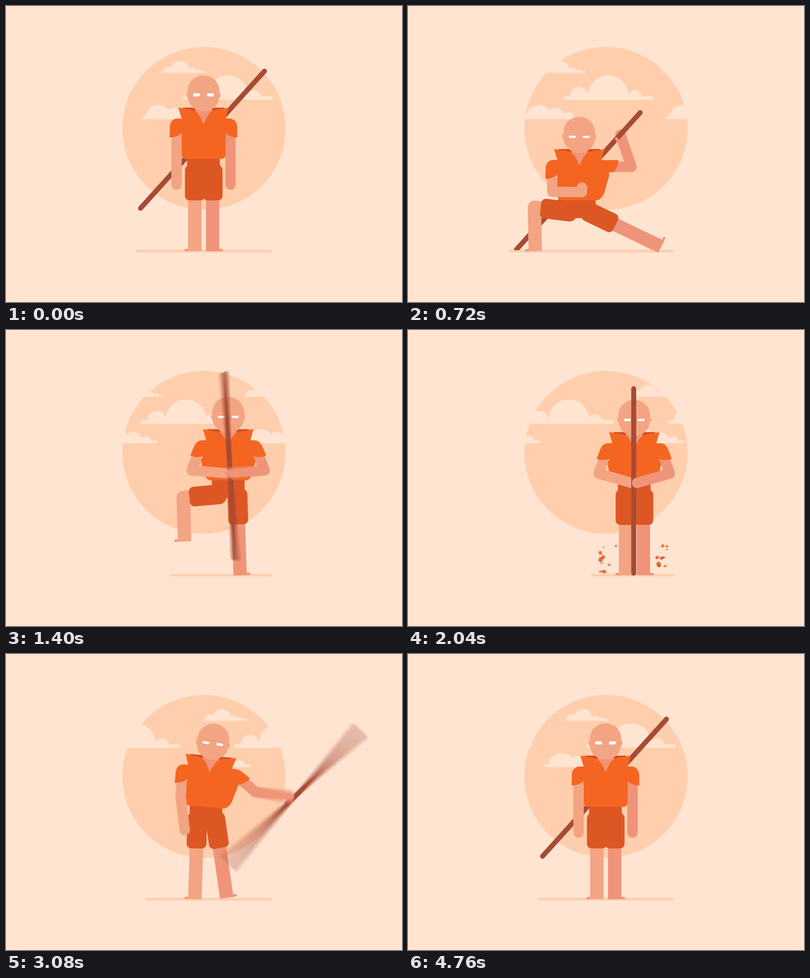
Write an HTML page with a canvas that moves like this. It is 800 px wide and 600 px high and loops after 4800 ms.

```html
<!DOCTYPE html>
<html lang="en">
<head>
<meta charset="utf-8">
<title>Staff form</title>
<style>
html, body { margin: 0; width: 100%; height: 100%; overflow: hidden; background: #ffe4d2; }
canvas { display: block; width: 800px; height: 600px; }
</style>
</head>
<body>
<canvas id="stage" width="800" height="600"></canvas>
<script>
const LOOP = 4800, STEP = 40, SHUTTER = 28, SAMPLES = 16;
const SKY = '#ffe4d2', SUN = '#ffceac', SHIRT = '#f56522', SHORTS = '#dc5723', COLLAR = '#d14f25',
  STAFF = '#a64b35', SKIN = '#f3a483', SHADE = '#ef9478';
const RAD = Math.PI / 180;

const screen = document.getElementById('stage').getContext('2d');
const layer = document.createElement('canvas');
layer.width = 800;
layer.height = 600;
const c = layer.getContext('2d');

// Key poses: x and y move the body, arm angles are measured outwards from straight down.
const feetUnder = x => ({ leftFootX: 381.5 + x, leftFootY: 497, rightFootX: 417.5 + x, rightFootY: 497 });
const arms = (leftUpper, leftFore, rightUpper, rightFore) => ({ leftUpper, leftFore, rightUpper, rightFore });
const grip = (upper, fore) => arms(-upper, fore, upper, -fore);
const staffAt = (staffX, staffY) => ({ staffX, staffY });

const stand = { x: 0, y: 0, lean: 0, squint: 0, fist: 0, ground: 264.5,
  ...feetUnder(0), ...arms(0, 0, 0, 0), ...staffAt(397, 271) };
const lunge = { ...stand, x: -53, y: 84, squint: 1, fist: 9, ground: 206.5,
  leftFootX: 257, rightFootX: 511.5, rightFootY: 488, ...arms(0, 90, 90, 199), ...staffAt(344, 355) };
const whirl = { ...lunge, ...arms(0, 90, 85, 93), ...staffAt(503, 318) };
const crane = { ...stand, x: 50, y: -5, squint: 1, ground: 334.5,
  leftFootX: 361, leftFootY: 428.5, rightFootX: 473, ...grip(22, 85), ...staffAt(452, 276) };
const lift = { ...crane, x: 56, y: -10, ...grip(20, 112), ...staffAt(455, 235) };
const slam = { ...stand, x: 58, y: 1, squint: 1, ground: 372.5,
  ...feetUnder(58), ...grip(20, 74), ...staffAt(456, 306) };
const cast = { ...stand, x: 5, lean: 5, squint: 0.7, ground: 284.5,
  rightFootX: 446, rightFootY: 494, ...arms(1, 12, 55, 87), ...staffAt(583, 290) };
const stow = { ...stand, squint: 1, ...arms(0, 0, 80, 205) };
const swing = { ...stand, squint: 1, ...arms(0, 0, 61, 61) };

const beats = [[80, stand], [480, lunge], [760, lunge], [960, whirl], [1100, whirl], [1400, crane],
  [1640, lift], [1720, lift], [1840, slam], [2640, slam], [3080, cast], [3400, stow], [3460, stow],
  [3680, swing], [3800, stand]];

// Cubic through the beats that never overshoots a pose.
function valueAt(field, t) {
  const time = i => beats[i][0], value = i => beats[i][1][field], last = beats.length - 1;
  if (t <= time(0)) return value(0);
  if (t >= time(last)) return value(last);
  const secant = i => (value(i + 1) - value(i)) / (time(i + 1) - time(i));
  const slope = i => {
    if (i === 0 || i === last) return 0;
    const a = secant(i - 1), b = secant(i);
    return a * b > 0 ? 2 * a * b / (a + b) : 0;
  };
  const i = beats.findIndex(beat => beat[0] > t) - 1;
  const w = time(i + 1) - time(i), u = (t - time(i)) / w, v = 1 - u;
  return value(i) * (1 + 2 * u) * v * v + slope(i) * w * u * v * v
    + value(i + 1) * u * u * (3 - 2 * u) - slope(i + 1) * w * u * u * v;
}

function ease(t, from, to) {
  const u = Math.min(1, Math.max(0, (t - from) / (to - from)));
  return u < 0.5 ? 2 * u * u : 1 - 2 * (1 - u) ** 2;
}

function poseAt(t) {
  const pose = { t };
  for (const field in stand) pose[field] = valueAt(field, t);
  pose.staffTurn = 42 + 498 * ease(t, 740, 1440) + 222 * ease(t, 2890, 3490);
  const settle = Math.max(0, t - 3800);
  const sway = -6 * Math.sin(settle / 90) * Math.exp(-settle / 130);
  pose.rightUpper += sway;
  pose.rightFore += sway;
  return pose;
}

function line(points, width, color, cap = 'round') {
  c.beginPath();
  points.forEach(([x, y]) => c.lineTo(x, y));
  c.lineWidth = width;
  c.strokeStyle = color;
  c.lineCap = cap;
  c.lineJoin = 'round';
  c.stroke();
}

function box(x, y, w, h, r, color) {
  c.beginPath();
  c.roundRect(x, y, w, h, r);
  c.fillStyle = color;
  c.fill();
}

function oval(x, y, rx, ry, color, turn = 0) {
  c.beginPath();
  c.ellipse(x, y, rx, ry, turn, 0, 7);
  c.fillStyle = color;
  c.fill();
}

function local(x, y, turn, draw) {
  c.save();
  c.translate(x, y);
  c.rotate(turn);
  draw();
  c.restore();
}

// Domes are [offset from the left end, top, radius].
function cloud(x, base, width, bar, ...domes) {
  box(x, base - bar, width, bar, bar / 2, SKY);
  c.save();
  c.beginPath();
  c.rect(x, 0, width, base - bar / 2);
  c.clip();
  domes.forEach(([dx, top, r]) => oval(x + dx, top + r, r, r, SKY));
  c.restore();
}

function drawSky(t) {
  c.fillStyle = SKY;
  c.fillRect(0, 0, 800, 600);
  oval(400, 248, 165, 165, SUN);
  const drift = t * 0.0605;
  for (const gap of [0, LOOP * 0.0605]) {
    cloud(357 + gap - drift, 190, 182, 7, [32, 164, 19], [91, 140.5, 41], [144, 171, 15]);
    cloud(274 + gap - drift, 229.5, 117, 5.5, [34, 200.5, 27], [67, 206.5, 20], [94, 215, 10.5]);
  }
  for (const x of [315 - t * 0.062, 549 - t * 0.04875])
    cloud(x, 135.5, 88, 3.5, [13, 122, 10], [37, 111.5, 19], [62, 125, 8], [75, 128, 6]);
}

function drawStaff(p, cutAtGround) {
  c.save();
  if (cutAtGround) {
    c.beginPath();
    c.rect(0, 0, 800, 495);
    c.clip();
  }
  const dx = Math.sin(p.staffTurn * RAD) * 187, dy = -Math.cos(p.staffTurn * RAD) * 187;
  line([[p.staffX - dx, p.staffY - dy], [p.staffX + dx, p.staffY + dy]], 10, STAFF);
  c.restore();
}

// Two-bone leg with the knee bending outwards; the hips never rise above standing height.
function solveLeg(p, side) {
  const hip = [399.5 + p.x + side * 18, 333 + Math.max(0, p.y)];
  const foot = side < 0 ? [p.leftFootX, p.leftFootY] : [p.rightFootX, p.rightFootY];
  const thigh = 73.5, shin = 89;
  const dx = foot[0] - hip[0], dy = foot[1] - hip[1], d = Math.hypot(dx, dy);
  const ux = dx / d, uy = dy / d;
  let along = d * thigh / (thigh + shin), out = 0;
  if (d < thigh + shin) {
    along = (thigh * thigh - shin * shin + d * d) / (2 * d);
    out = side * Math.sqrt(Math.max(0, thigh * thigh - along * along));
  }
  return { hip, foot, knee: [hip[0] + ux * along + uy * out, hip[1] + uy * along - ux * out] };
}

function drawLeg(p, side) {
  const { hip, knee, foot } = solveLeg(p, side);
  const skin = side < 0 ? SKIN : SHADE;
  const angle = (a, b) => -Math.atan2(b[0] - a[0], b[1] - a[1]);
  line([hip, knee], 27, skin, 'butt');
  local(...knee, angle(knee, foot), () => {
    const length = Math.hypot(foot[0] - knee[0], foot[1] - knee[1]);
    c.scale(side, 1);
    box(0, length - 4.5, 21, 4.5, [2, 3, 1, 0], SHADE);
    box(-13.5, -13.5, 27, length + 13.5, [13.5, 13.5, 0, 0], skin);
  });
  local(...hip, angle(hip, knee), () => box(-20, -13, 40, 74, [14, 14, 9, 9], SHORTS));
}

function inTorso(p, draw) {
  local(399.3 + p.x, 320 + p.y, p.lean * RAD, () => {
    c.translate(-399.3, -320);
    draw();
  });
}

const reach = ([x, y], angle, length) =>
  [x + Math.sin(angle * RAD) * length, y + Math.cos(angle * RAD) * length];

function drawArm(p, side) {
  const upper = side < 0 ? p.leftUpper : p.rightUpper, fore = side < 0 ? p.leftFore : p.rightFore;
  const fist = side < 0 ? p.fist : 0;
  const shoulder = [399 + side * 54.5, 242];
  const elbow = reach(shoulder, upper, 51), wrist = reach(elbow, fore, 69 - fist);
  const points = [shoulder, elbow, wrist];
  if (fist > 0.1) points.push(reach(wrist, fore + 90, fist));
  line(points, 21, side < 0 ? SKIN : SHADE);
  return wrist;
}

function drawSleeve(p, side) {
  local(399 + side * 54.5, 242, -(side < 0 ? p.leftUpper : p.rightUpper) * RAD, () => {
    c.scale(side, 1);
    c.beginPath();
    c.moveTo(-11, -14);
    c.lineTo(-3, -14);
    c.bezierCurveTo(7, -14, 13.5, -7, 13.5, 3);
    c.lineTo(14, 24.5);
    c.quadraticCurveTo(0, 24.5, -11, 15);
    c.fillStyle = SHIRT;
    c.fill();
  });
}

// Half of the shirt; a raised arm widens it at the armpit.
function drawShirtHalf(side, armAngle) {
  const flare = 16 * Math.min(1, 2.2 * Math.abs(Math.sin(armAngle * RAD)));
  const at = d => 399.2 + side * d;
  c.beginPath();
  c.moveTo(at(-1), 238);
  c.lineTo(at(1.2), 238);
  c.quadraticCurveTo(at(8), 218, at(19), 211.5);
  c.lineTo(at(51), 206);
  c.lineTo(at(44.5), 228);
  c.lineTo(at(44.5 + flare * 0.7), 229);
  c.lineTo(at(44.5 + flare), 259);
  c.lineTo(at(44.5 + flare * 0.35), 300 - flare * 0.3);
  c.quadraticCurveTo(at(44), 310, at(36 - flare * 0.2), 310);
  c.lineTo(at(-1), 310);
  c.fillStyle = SHIRT;
  c.fill();
}

function drawShirt(p) {
  box(357, 206, 84, 7, 0, COLLAR);
  box(383, 195, 33, 43.5, 0, SHADE);
  drawShirtHalf(-1, p.leftUpper);
  drawShirtHalf(1, p.rightUpper);
}

function drawHead(p) {
  local(399, 214, p.lean * 0.6 * RAD, () => {
    for (const side of [-1, 1]) oval(side * 31.5, -33.5, 2.7, 5, SKIN);
    box(-32, -73.5, 64, 73.5, 32, SKIN);
    const s = p.squint, round = 3 - 2.5 * s;
    for (const x of [-21, 7]) box(x, -37 + 2 * s, 14, 6.5 - 2 * s, [round, round, 3, 3], '#fff');
  });
}

// Dust thrown up on both sides of the staff when it strikes the ground.
function drawDebris(t) {
  const u = (t - 1840) / 200;
  if (u <= 0 || u >= 2) return;
  let seed = 7;
  const random = () => (seed = seed * 16807 % 2147483647) / 2147483647;
  const rise = 1 - (u - 1) ** 2, fade = Math.min(1, 2 - u);
  for (let i = 0; i < 18; i++) {
    const side = i % 2 ? 1 : -1;
    const x = 456 + side * (36 + 34 * random()) * (0.5 + 0.5 * u);
    const y = 497 - (4 + 60 * random()) * rise;
    const r = (1.5 + 4.5 * random() ** 1.5) * fade, turn = 6 * random() + u;
    oval(x, y, r, r * 0.75, STAFF, turn);
    oval(x, y - r * 0.2, r * 0.9, r * 0.6, SHIRT, turn);
  }
}

function drawFigure(p) {
  const front = p.t > 800 && p.t < 3260;
  line([[p.ground, 497], [534.5, 497]], 5, SUN);
  if (!front) {
    let hand;
    inTorso(p, () => { hand = drawArm(p, 1); });
    drawStaff(p, true);
    if (p.t > 300 && p.t < 800) inTorso(p, () =>
      line([[hand[0] - 8, hand[1] + 8], [hand[0] - 5, hand[1] + 13]], 6, SHADE));
  }
  drawLeg(p, 1);
  drawLeg(p, -1);
  box(366 + p.x, 306 + p.y, 66, 40, [0, 0, 16, 16], SHORTS);
  inTorso(p, () => {
    drawShirt(p);
    drawArm(p, -1);
    drawSleeve(p, -1);
    if (!front) drawSleeve(p, 1);
    drawHead(p);
  });
  if (front) {
    drawStaff(p, false);
    inTorso(p, () => {
      drawArm(p, 1);
      drawSleeve(p, 1);
    });
  }
  drawDebris(p.t);
}

// Averages several moments inside the shutter for motion blur.
function render(t) {
  const count = t < 80 || t > 4440 ? 1 : SAMPLES;
  for (let i = 0; i < count; i++) {
    drawSky(t);
    drawFigure(poseAt(t + ((i + 0.5) / count - 0.5) * SHUTTER));
    screen.globalAlpha = 1 / (i + 1);
    screen.drawImage(layer, 0, 0);
  }
}

const start = performance.now();
let shown = -1;
function frame() {
  const elapsed = Math.max(0, performance.now() - start) % LOOP;
  const t = Math.floor(elapsed / STEP) * STEP;
  if (t !== shown) render(shown = t);
  requestAnimationFrame(frame);
}
frame();
</script>
</body>
</html>
```
